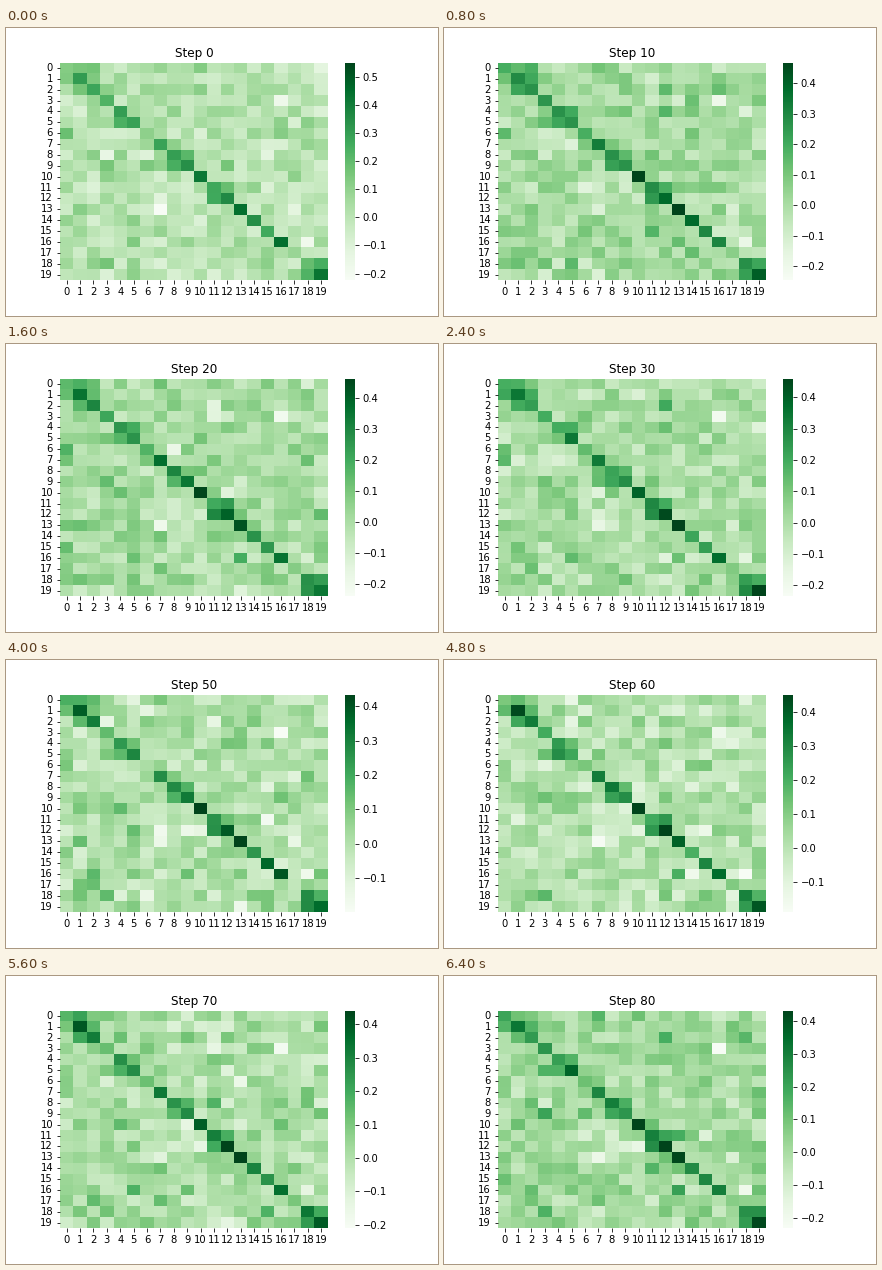
Animation, 432 px wide and 288 px high, one loop 7.2 s. Source, as a matplotlib script:

```python
import numpy as np
import matplotlib.pyplot as plt
from matplotlib.animation import FuncAnimation
from matplotlib.ticker import MultipleLocator

N = 20
STEPS = range(0, 90, 10)

# Colour range at a few steps, interpolated in between
KEY_STEPS = [0, 10, 30, 40, 60, 80]
LOW = [-0.223, -0.246, -0.2345, -0.21, -0.188, -0.232]
HIGH = [0.55, 0.468, 0.46, 0.418, 0.4515, 0.432]

# Diagonal level and the diagonal cells that stand out from it
DIAGONAL = 0.28
PEAKS = {10: 0.46, 12: 0.42, 13: 0.44, 19: 0.41, 1: 0.37, 16: 0.37}
DIPS = {0: 0.18, 3: 0.18, 6: 0.11, 17: 0.08}

# Linked neighbours (first index of each pair) and other lasting links
PAIRS = {0: 0.14, 1: 0.15, 4: 0.14, 8: 0.16, 11: 0.2, 18: 0.21}
LINKS = [(0, 2), (2, 12), (4, 12), (6, 0), (9, 3), (16, 5), (16, 13), (18, 3)]
LINK = 0.13
GAPS = [(3, 16), (13, 7), (16, 18)]
GAP = -0.19


def noise(seed):
    return np.random.default_rng(seed).normal(0, 1, (N, N))


def pattern():
    grid = np.full((N, N), 0.01) + 0.035 * noise(7)
    for k, level in PAIRS.items():
        grid[k, k + 1] = level
        grid[k + 1, k] = level + 0.04
    for cell in LINKS:
        grid[cell] = LINK
    for cell in GAPS:
        grid[cell] = GAP
    for k in range(N):
        grid[k, k] = (PEAKS | DIPS).get(k, DIAGONAL)
    return grid


BASE = pattern()


def state(step):
    low, high = (np.interp(step, KEY_STEPS, ends) for ends in (LOW, HIGH))
    grid = BASE + 0.045 * noise(100 + step)
    return np.clip(grid, low, high), low, high


plt.rcParams["font.family"] = "DejaVu Sans"
fig = plt.figure(figsize=(6, 4), dpi=72, facecolor="white")
ax = fig.add_axes([0.125, 0.125, 0.62, 0.755])
cax = fig.add_axes([0.78375, 0.125, 0.755 * 288 / 20 / 432, 0.755])

mesh = ax.pcolormesh(BASE, cmap="Greens", linewidth=0, edgecolor="white")
ax.set(xlim=(0, N), ylim=(N, 0))
ax.set_xticks(np.arange(N) + 0.5, range(N))
ax.set_yticks(np.arange(N) + 0.5, range(N), va="center")
ax.spines[:].set_visible(False)
title = ax.set_title("", fontsize=12)

bar = fig.colorbar(mesh, cax=cax, ticks=MultipleLocator(0.1))
bar.outline.set_linewidth(0)


def draw(i):
    grid, low, high = state(STEPS[i])
    mesh.set_array(grid)
    mesh.set_clim(low, high)
    title.set_text(f"Step {STEPS[i]}")
    return mesh, title


anim = FuncAnimation(fig, draw, frames=len(STEPS), interval=800,
                     repeat=True, repeat_delay=0, blit=False)
plt.show()
```
